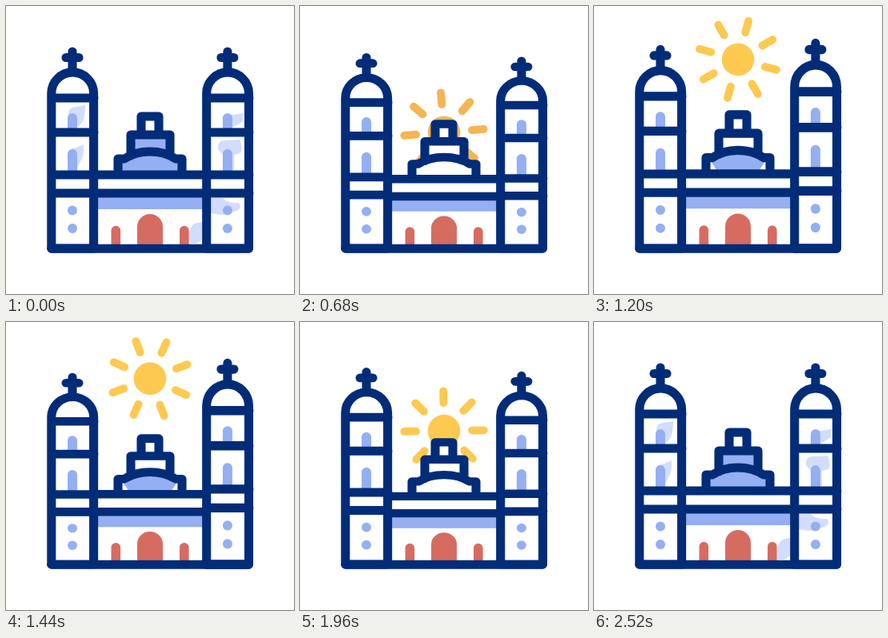
These frames come from a looping animation (360 px wide and 360 px high, 3000 ms). An HTML page:

```html
<!DOCTYPE html>
<html lang="en">
<head>
<meta charset="utf-8">
<title>Cathedral and sun</title>
<style>
html, body { margin: 0; width: 100%; height: 100%; overflow: hidden; background: #fff; }
svg { display: block; width: 100%; height: 100%; }
.line { fill: none; stroke: #032c78; stroke-width: 11.1; stroke-linecap: round; stroke-linejoin: round; }
.white { fill: #fff; }
.blue { fill: #94aff2; }
.pale { fill: #d2ddfc; }
.red { fill: #d66c61; }
</style>
</head>
<body>
<svg viewBox="0 0 360 360">
  <defs>
    <g id="walls">
      <path class="white" d="M56.8 303V109.3a26.4 26.4 0 0 1 52.8 0V303Z"/>
    </g>
    <g id="front">
      <path class="blue" d="M77 154V140a6 6 0 0 1 12 0V154ZM77 207V185a6 6 0 0 1 12 0V207Z"/>
      <circle class="blue" cx="83" cy="255.5" r="6"/>
      <circle class="blue" cx="83" cy="278" r="6"/>
      <path class="line" d="M56.8 303V109.3a26.4 26.4 0 0 1 52.8 0V303ZM57 115H110M57 158H110M57 211H110M57 234H110M83 57V80M75 64.5H91"/>
    </g>
  </defs>

  <g id="sun">
    <circle r="20.3"/>
    <g id="rays" fill="none" stroke-width="9.8" stroke-linecap="round"></g>
  </g>

  <g id="middle">
    <path class="white" d="M110 303V211H140V191H156V161H169V138H191V161H205V191H220V211H250V303Z"/>
    <path id="blocks" class="blue" d="M156 161H205V191H220V211H140V191H156Z"/>
    <path id="dome" class="blue" d="M153 206L145 194C156 185 168 182 180 182S204 185 215 194L207 206Z"/>
    <path class="white" d="M169 138H191V161H169Z"/>
    <path class="blue" d="M112 238H248V254H112Z"/>
    <path id="shadeMid" class="pale" d="M229 297Q227 273 239 271L245 270V292L238 297Z"/>
    <path class="red" d="M164 298V276a16 16 0 0 1 32 0V298ZM131.5 298V280.5a5.8 5.8 0 0 1 11.6 0V298ZM217 298V280.5a5.8 5.8 0 0 1 11.6 0V298Z"/>
    <path class="line" d="M169 161V138H191V161M156 187V161H205V187M140 211V191H148C157 185 168 182 180 182S203 185 212 191H220V211M110 211H250M110 234H250"/>
  </g>

  <g id="left">
    <use href="#walls"/>
    <path id="shadeLeft" class="pale" d="M78 136Q78 126 87 126L99 124Q99 136 96 144Q92 152 84 152ZM77 187Q78 177 88 177L97 173Q98 187 93 194L88 205H80Z"/>
    <use href="#front"/>
  </g>
  <g id="right">
    <use href="#walls" x="193.9"/>
    <path id="shadeHigh" class="pale" d="M271 140Q272 133 283 136L296 134V144Q288 150 281 152H271ZM265 179Q264 167 275 168L292 167Q297 178 293 184L285 186V205H271V186Z"/>
    <path id="shadeLow" class="pale" d="M256 240H271Q277 247 291 246Q296 252 288 256L272 261Q257 260 256 258Z"/>
    <use href="#front" x="193.9"/>
  </g>
  <path class="line" d="M56.8 303.2H303.3"/>
</svg>
<script>
const LOOP = 3000, BASE = 303;
const SUN_LOW = 250, SUN_HIGH = 66.8;
const $ = id => document.getElementById(id);
const clamp = v => Math.max(0, Math.min(1, v));

// [time, vertical scale]
const stretch = {
  left: [[0, 1], [480, .925], [960, 1.045], [1600, .935], [2200, 1]],
  middle: [[0, 1], [440, .91], [1100, 1.02], [1760, .894], [2320, 1]],
  right: [[320, 1], [560, .945], [1280, 1.045], [1780, .95], [2440, 1]]
};

function track(keys, t) {
  if (t <= keys[0][0]) return keys[0][1];
  for (let i = 1; i < keys.length; i++) {
    const [a, from] = keys[i - 1], [b, to] = keys[i];
    if (t < b) return from + (to - from) * (1 - Math.cos(Math.PI * (t - a) / (b - a))) / 2;
  }
  return keys[keys.length - 1][1];
}

function sunY(t) {
  if (t < 1200) return SUN_HIGH + (SUN_LOW - SUN_HIGH) * (1 - clamp((t - 545) / 655)) ** 3;
  return Math.min(SUN_LOW, SUN_HIGH + (.00716 * (t - 1200)) ** 2.5);
}

function sunColor(t) {
  const k = Math.min(clamp((t - 540) / 180), clamp((2250 - t) / 250));
  const mix = (a, b) => Math.round(a + (b - a) * k);
  return `rgb(${mix(214, 253)},${mix(108, 201)},${mix(97, 80)})`;
}

const show = (id, on) => $(id).setAttribute('visibility', on ? 'visible' : 'hidden');

function draw(t) {
  for (const id in stretch) {
    const s = track(stretch[id], t);
    $(id).setAttribute('transform', `translate(0 ${BASE * (1 - s)}) scale(1 ${s})`);
  }
  const color = sunColor(t);
  $('sun').setAttribute('transform', `translate(180 ${sunY(t)}) rotate(${4.5 + .038 * (t - 920)})`);
  $('sun').setAttribute('fill', color);
  $('rays').setAttribute('stroke', color);

  const resting = t < 240 || t >= 2080;
  show('blocks', resting);
  show('dome', resting || (t > 720 && t < 1520));
  show('shadeLeft', resting);
  show('shadeHigh', resting);
  show('shadeLow', t < 520 || t >= 2080);
  show('shadeMid', t < 520 || t >= 2080);
}

let d = '';
for (let i = 0; i < 8; i++) {
  const x = Math.sin(i * Math.PI / 4), y = -Math.cos(i * Math.PI / 4);
  d += `M${35 * x} ${35 * y}L${49.8 * x} ${49.8 * y}`;
}
$('rays').innerHTML = `<path d="${d}"/>`;

const start = performance.now();
function tick() {
  draw((performance.now() - start) % LOOP);
  requestAnimationFrame(tick);
}
tick();
</script>
</body>
</html>
```
